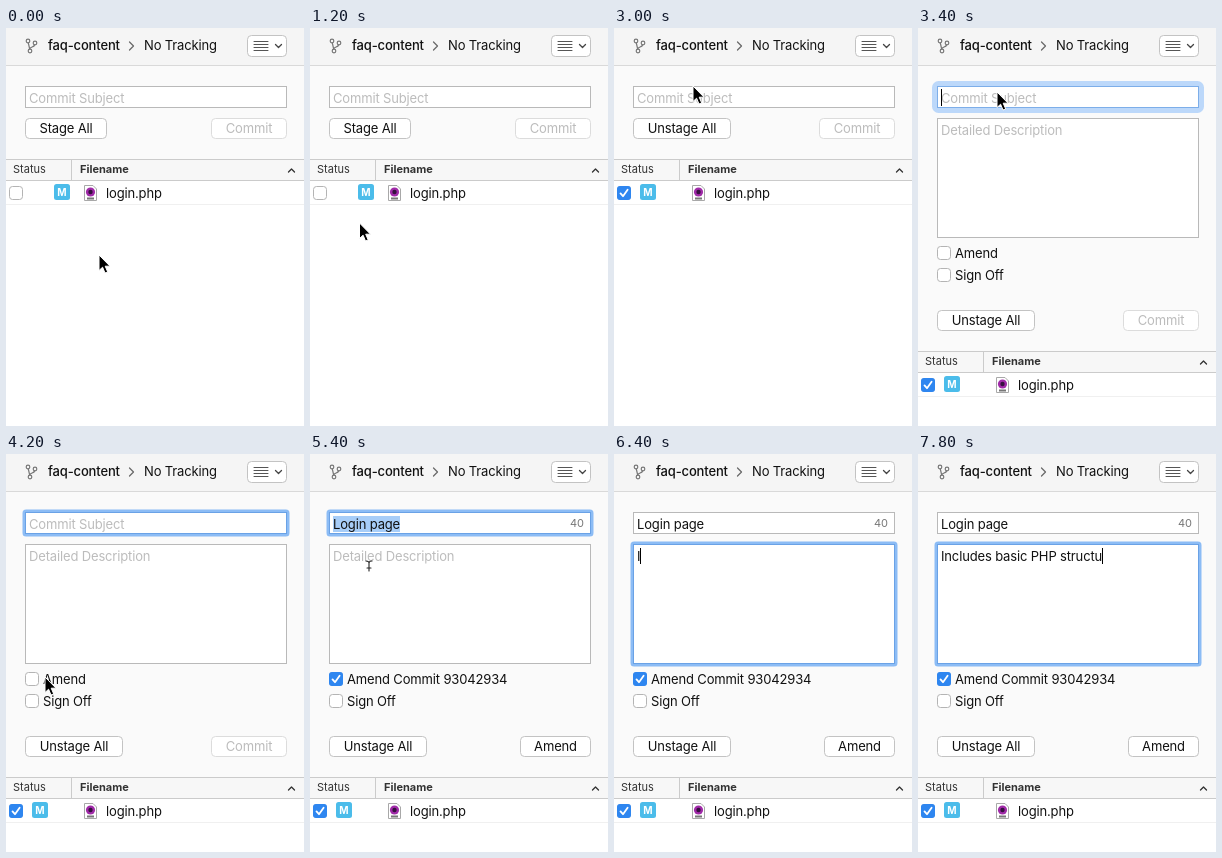
Write an HTML page that moves like this. It is 298 px wide and 398 px high and loops after 8 s.

```html
<!DOCTYPE html>
<html lang="en">
<head>
<meta charset="utf-8">
<title>Amend a commit</title>
<style>
  html, body { margin: 0; width: 100%; height: 100%; overflow: hidden; background: #fff; }
  svg { display: block; width: 100vw; height: 100vh; }
  text { font: 13px Inter, Roboto, sans-serif; letter-spacing: -0.15px; fill: #111; white-space: pre; }
  .head { font-size: 11px; letter-spacing: 0; fill: #333; }
  .mid { text-anchor: middle; }
  .hint { fill: #bcbcbc; }
  .line { fill: none; stroke-linecap: round; stroke-linejoin: round; }
  .box { fill: #fff; stroke: #b9b9b9; }
  .button { fill: #fff; stroke: #c3c3c3; }
  .pale { stroke: #dcdcdc; }
  .caret { fill: #000; }
</style>
</head>
<body>
<svg viewBox="0 0 298 398">
  <defs>
    <clipPath id="fold"><rect id="foldBox" x="0" y="85" width="298" height="0"/></clipPath>
    <g id="empty"><rect x=".5" y=".5" width="13" height="13" rx="3" fill="#fff" stroke="#b4b4b4"/></g>
    <g id="ticked">
      <rect width="14" height="14" rx="3" fill="#2e86f0"/>
      <path class="line" d="M3.5 7.4 6 10.2 10.6 3.8" stroke="#fff" stroke-width="1.8"/>
    </g>
  </defs>

  <rect width="298" height="398" fill="#fff"/>
  <rect id="panel" y="38" width="298" height="93" fill="#fafafa"/>

  <!-- title bar -->
  <rect width="298" height="37" fill="#f5f5f5"/>
  <rect y="37" width="298" height="1" fill="#d9d9d9"/>
  <g class="line" stroke="#777" stroke-width="1.2">
    <circle cx="22" cy="13" r="1.8"/><circle cx="29" cy="15" r="1.8"/><circle cx="24" cy="23" r="1.8"/>
    <path d="M22.3 15 23.7 21M28.6 17C28 19.5 24 18.5 23.8 21"/>
    <path d="M123.5 14 127.5 18 123.5 22" stroke="#666"/>
  </g>
  <text x="42" y="22" font-weight="500" style="font-weight:500">faq-content</text>
  <text x="138" y="22">No Tracking</text>
  <rect class="button" x="241.5" y="7.5" width="39" height="21" rx="4"/>
  <path class="line" d="M248 13.5H262M248 16.5H262M248 19.5H262M248 22.5H262" stroke="#555"/>
  <path class="line" d="M269.5 16.5 272.5 19.5 275.5 16.5" stroke="#444" stroke-width="1.3"/>

  <!-- subject -->
  <rect class="box" x="19.5" y="58.5" width="261" height="21"/>
  <g id="subjectRing"></g>
  <rect id="selection" x="23" y="62" width="67" height="16" fill="#a7cdf8"/>
  <text id="subject" x="23" y="75"></text>
  <text id="count" class="head" x="260" y="73" style="fill:#777">40</text>
  <rect id="subjectCaret" class="caret" x="23" y="61" width="1" height="17"/>

  <!-- details -->
  <g clip-path="url(#fold)">
    <rect class="box" x="19.5" y="90.5" width="261" height="119"/>
    <g id="bodyRing"></g>
    <text id="body" x="23" y="107"></text>
    <rect id="bodyCaret" class="caret" y="94" width="1" height="16"/>
    <use href="#empty" x="19" y="218"/>
    <use id="amendTick" href="#ticked" x="19" y="218"/>
    <text id="amend" x="37" y="230"></text>
    <use href="#empty" x="19" y="240"/>
    <text x="37" y="252">Sign Off</text>
  </g>

  <!-- buttons and file list -->
  <g id="lower">
    <rect id="stageBox" class="button" x="19.5" y="90.5" height="20" rx="4"/>
    <text id="stage" class="mid" y="105"></text>
    <rect id="commitBox" class="button" y="90.5" height="20" rx="4"/>
    <text id="commit" class="mid" y="105"></text>

    <rect y="131" width="298" height="22" fill="#f7f7f7"/>
    <path d="M0 131.5H298M0 152.5H298M65.5 132V152" stroke="#cbcbcb"/>
    <text class="head" x="7" y="145">Status</text>
    <text class="head" x="74" y="145" style="font-weight:700">Filename</text>
    <path class="line" d="M282.5 144 285.5 141 288.5 144" stroke="#333" stroke-width="1.3"/>
    <rect y="176" width="298" height="1" fill="#f0f0f0"/>
    <use href="#empty" x="3" y="158"/>
    <use id="fileTick" href="#ticked" x="3" y="158"/>
    <g id="badge">
      <rect y="156" width="16" height="16" rx="2.5" fill="#4bbcea"/>
      <text class="mid" x="8" y="168" style="font-size:10px;font-weight:700;fill:#fff;letter-spacing:0">M</text>
    </g>
    <path d="M78.5 157.5H87L90.5 161V172.5H78.5Z" fill="#fff" stroke="#a8a8a8"/>
    <circle cx="84.5" cy="164" r="4.6" fill="#a02aa8"/>
    <circle cx="84.5" cy="164" r="2.2" fill="#35103f"/>
    <rect x="81" y="169.5" width="7" height="2" fill="#777"/>
    <text x="100" y="170">login.php</text>
  </g>

  <path id="arrow" d="M0 0V15.5L3.6 12.2 6 18 8.7 16.9 6.2 11.2H11Z" fill="#000" stroke="#fff" stroke-linejoin="round"/>
  <path id="beam" class="line" d="M-3-5Q0-5 0-3Q0-5 3-5M0-3V5M-2 2H2" stroke="#222" stroke-width="1.1"/>
</svg>

<script>
const LOOP = 8000, STEP = 200, OPEN = 192;
const MESSAGE = "Includes basic PHP structu";
const $ = id => document.getElementById(id);
const set = (id, attrs) => { for (const k in attrs) $(id).setAttribute(k, attrs[k]); };
const show = (id, on) => set(id, { visibility: on ? "visible" : "hidden" });
const ease = p => p * p * (3 - 2 * p);

// time, x, y
const path = [
  [0, 93, 227], [800, 93, 227], [1600, 6, 163], [2200, 6, 163], [3000, 79, 58], [3200, 79, 64],
  [3400, 79, 64], [4200, 39, 223], [4800, 39, 223], [5400, 59, 112], [5800, 59, 112], [6200, 82, 213]
];

function pointer(t) {
  const i = path.findIndex(k => k[0] > t);
  if (i < 0) return path[path.length - 1].slice(1);
  const a = path[i - 1], b = path[i], p = ease((t - a[0]) / (b[0] - a[0]));
  return [a[1] + (b[1] - a[1]) * p, a[2] + (b[2] - a[2]) * p];
}

function ring(id, y, h, start, end, t) {
  if (t < start || t >= end) { $(id).innerHTML = ""; return; }
  const wide = t < start + STEP;
  const outline = (grow, r, color, w) =>
    `<rect x="${19.5 - grow}" y="${y - grow}" width="${261 + 2 * grow}" height="${h + 2 * grow}"
      rx="${r}" fill="none" stroke="${color}" stroke-width="${w}"/>`;
  $(id).innerHTML = wide
    ? outline(3, 4, "#bcd8fa", 5) + outline(0, 0, "#7daee9", 1)
    : outline(1.5, 2, "#8cbcf5", 3) + outline(0, 0, "#6aa2e6", 1);
}

function label(id, text, hint) {
  $(id).textContent = text;
  $(id).classList.toggle("hint", !!hint);
}

function button(id, text, x, w, off) {
  set(id + "Box", { x: x + .5, width: w - 1 });
  $(id + "Box").classList.toggle("pale", !!off);
  set(id, { x: x + w / 2 });
  label(id, text, off);
}

function typed(t) {
  if (t < 6400) return 0;
  if (t < 6800) return t < 6600 ? 1 : 2;
  return Math.min(MESSAGE.length, Math.round(4 + 22 * (t - 6800) / 1000));
}

function draw(now) {
  const t = Math.floor((now % LOOP) / STEP) * STEP;
  const staged = t >= 2000, amended = t >= 4600, filled = t >= 4800;
  const drop = OPEN * (t < 3200 ? 0 : t < 3400 ? .5 : 1);

  set("panel", { height: 93 + drop });
  set("foldBox", { height: drop });
  set("lower", { transform: `translate(0 ${drop})` });

  show("fileTick", staged);
  set("badge", { transform: `translate(${staged ? 26 : 48} 0)` });
  staged ? button("stage", "Unstage All", 19, 98) : button("stage", "Stage All", 19, 82);
  filled ? button("commit", "Amend", 210, 71) : button("commit", "Commit", 205, 76, true);

  ring("subjectRing", 58.5, 21, 3400, 5600, t);
  label("subject", filled ? "Login page" : "Commit Subject", !filled);
  show("count", filled);
  show("selection", filled && t < 5600);
  show("subjectCaret", t >= 3400 && t < 4000);

  show("amendTick", amended);
  label("amend", filled ? "Amend Commit 93042934" : "Amend");

  const n = typed(t);
  ring("bodyRing", 90.5, 119, 5800, LOOP, t);
  label("body", n ? MESSAGE.slice(0, n) : "Detailed Description", !n);
  set("bodyCaret", { x: 23 + (n ? Math.round($("body").getComputedTextLength()) : 0) });
  show("bodyCaret", t >= 5800);

  const [x, y] = pointer(t), text = t >= 5400 && t < 6200;
  for (const id of ["arrow", "beam"]) set(id, { transform: `translate(${x} ${y})` });
  show("arrow", t < 6400 && !text);
  show("beam", text);
}

const begin = performance.now();
function tick() {
  draw(performance.now() - begin);
  requestAnimationFrame(tick);
}
tick();
</script>
</body>
</html>
```
